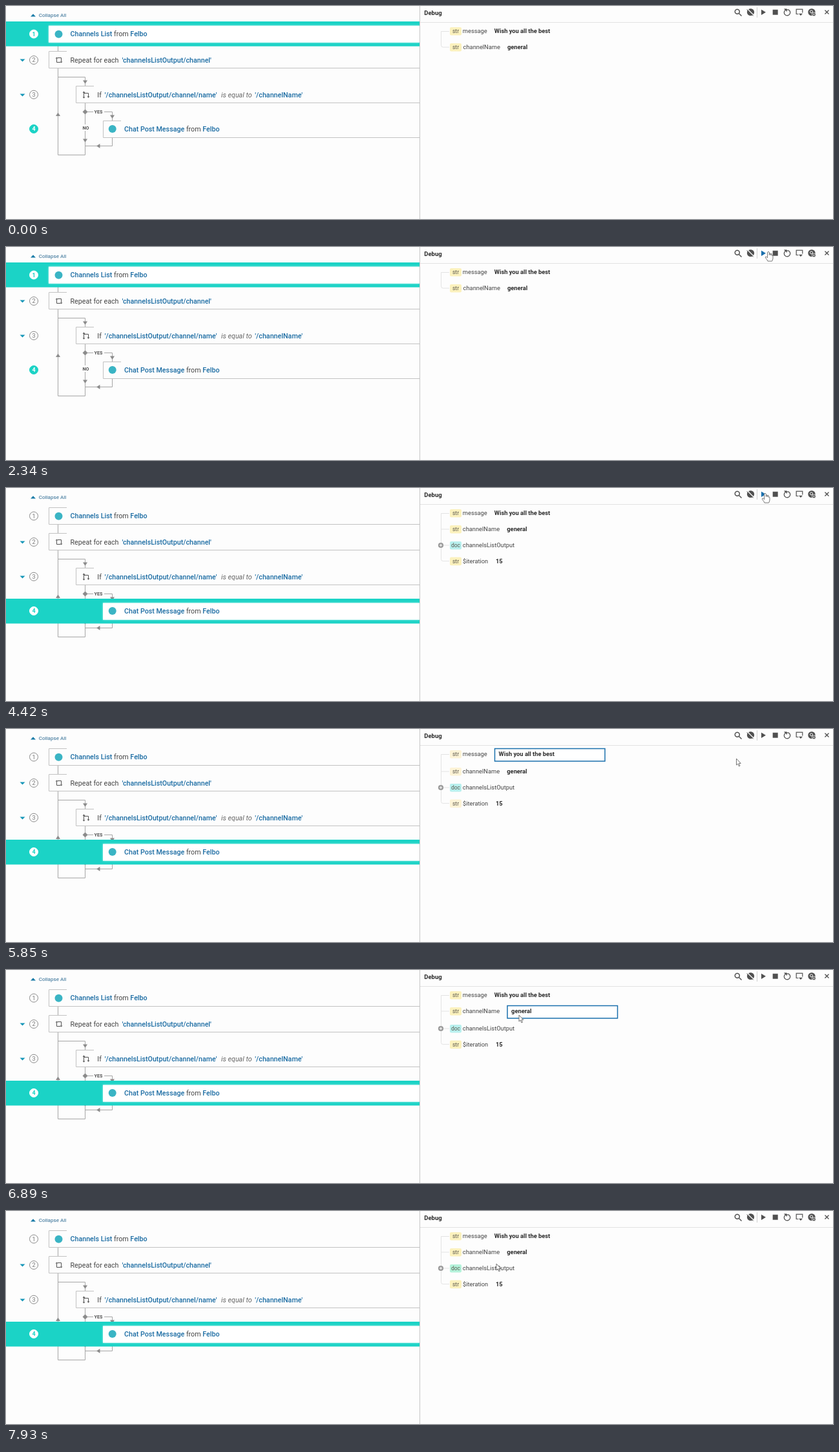
An HTML page for the animation above (8 s loop, 1280 px wide and 331 px high).

```html
<!DOCTYPE html>
<html lang="en">
<head>
<meta charset="utf-8">
<title>Flow debugger</title>
<style>
  html, body { margin: 0; width: 100%; height: 100%; overflow: hidden; background: #fdfdfd; }
  svg { display: block; width: 1280px; height: 331px; }
  text { font-family: Roboto, Arial, sans-serif; white-space: pre; fill: #444; }
  .link { fill: #1b6ca3; font-weight: 500; }
  .soft { font-style: italic; fill: #666; }
  .bold { font-weight: 700; fill: #2b2b2b; }
  .tag { font-weight: 700; fill: #505050; }
  .wire { fill: none; stroke: #a6a6a6; }
  .head { fill: #8b8b8b; }
  .icon { fill: none; stroke: #505050; stroke-width: 1.5; }
  .solid { fill: #505050; }
  .glow { filter: drop-shadow(0 0 1.5px rgba(255, 255, 255, .6)); }
</style>
</head>
<body>
<svg id="stage" viewBox="0 0 1280 331"></svg>
<script>
const LOOP = 8000, STEP = 130;
const LOAD_START = 3900, LOAD_END = 4420;
const TEAL = '#1bd3c6', BLUE = '#1b70ad', BRAND = '#3ab4c4';
const APP = 'Felbo';

// time, x, y of the pointer tip
const POINTER = [
  [260, 1150, 226], [1170, 1177, 4], [1950, 1180, 7], [2340, 1180, 7],
  [2600, 1176, 8], [3120, 1175, 8], [5849, 1175, 8], [5850, 1130.5, 46],
  [6630, 812, 66], [6890, 794, 70], [7540, 766, 83], [7930, 759, 82]
];

const stage = document.getElementById('stage');
const ease = p => p * p * (3 - 2 * p);
const text = (x, y, size, body, attrs = '') =>
  `<text x="${x}" y="${y}" font-size="${size}" ${attrs}>${body}</text>`;
const path = (d, cls, extra = '') => `<path d="${d}" class="${cls}" ${extra}/>`;
const rect = (x, y, w, h, fill, extra = '') =>
  `<rect x="${x}" y="${y}" width="${w}" height="${h}" fill="${fill}" ${extra}/>`;
const circle = (x, y, r, fill, extra = '') =>
  `<circle cx="${x}" cy="${y}" r="${r}" fill="${fill}" ${extra}/>`;
const link = body => `<tspan class="link">${body}</tspan>`;
const at = (x, y, body) => `<g transform="translate(${x} ${y})">${body}</g>`;

function arrow(x, y, angle) {
  return path('M-3.5-2.5h7L0 3z', 'head', `transform="translate(${x} ${y}) rotate(${angle})"`);
}

function pointerAt(t) {
  if (t < POINTER[0][0]) return null;
  const i = POINTER.findIndex(k => k[0] > t);
  if (i < 0) return POINTER[POINTER.length - 1].slice(1);
  const [t0, x0, y0] = POINTER[i - 1], [t1, x1, y1] = POINTER[i];
  const p = ease((t - t0) / (t1 - t0));
  return [x0 + (x1 - x0) * p, y0 + (y1 - y0) * p];
}

function badge(n, y, kind) {
  const styles = {
    plain: ['#fdfdfd', '#8a8a8a', '#777'],
    active: ['#fff', '#fff', TEAL],
    filled: [TEAL, TEAL, '#fff']
  };
  const [fill, stroke, ink] = styles[kind];
  const weight = kind === 'plain' ? 400 : 700;
  return circle(43, y, 6.5, fill, `stroke="${stroke}"`) +
    text(43, y + 3.2, 9, n, `text-anchor="middle" font-weight="${weight}" style="fill:${ink}"`);
}

function card(x, y, active) {
  if (!active) {
    return rect(x, y, 640 - x, 27, '#fdfdfd') +
      path(`M${x + 28} ${y + .5}H${x + .5}V${y + 26.5}H640`, 'wire', 'style="stroke:#c2c2c2"');
  }
  return rect(0, y - 6, 640, 38.6, TEAL) +
    rect(x, y + .6, 640 - x, 26.2, '#fff', 'class="glow"');
}

function wires() {
  return path('M80.5 57V70M80.5 97V231.5H122.5V151M80.5 110.5H122.5V124' +
      'M122.5 164.5H164.5V178M164.5 205V217.5H122.5', 'wire') +
    arrow(122.5, 118, 0) + arrow(80.5, 168.5, 180) + arrow(164.5, 172, 0) +
    arrow(122.5, 209, 0) + arrow(143, 217.5, 90) +
    path('M122.5 160.5l4 4-4 4-4-4z', 'head') +
    rect(135, 160, 17, 9, '#fdfdfd') + text(136.5, 167, 7.1, 'YES', 'class="tag"') +
    rect(117, 184, 13, 10, '#fdfdfd') + text(118.4, 192, 7.1, 'NO', 'class="tag"');
}

function flow(finished) {
  const caret = y => path(`M21.5 ${y - 1.6}h8l-4 4.2z`, '', 'fill="#1596b8"');
  const loopIcon = at(82, 84,
    path('M-3.5-2.5V3.5H2.2M3.5 2.5V-3.5H-2.2', 'icon', 'style="stroke-width:1"') +
    path('M-3.5-4.6l2 2.2h-4zM3.5 4.6l-2-2.2h4z', 'solid'));
  const forkIcon = at(124, 138,
    path('M-3.5-4V5M-3.5-2.5H3.5V3', 'icon', 'style="stroke-width:1"') +
    path('M-3.5-5.6l2 2.3h-4zM-3.5 5.6l2-2h-4zM3.5 4.8l2-2.3h-4z', 'solid'));
  return path('M38 16.5h8l-4-4.2z', '', 'fill="#1b7ca8"') +
    text(50.7, 17, 8.1, 'Collapse All', 'style="fill:#2c6a92"') +
    wires() + card(66, 70) + card(108, 124) +
    card(66, 30, !finished) + card(150, 178, finished) +
    badge(1, 43.5, finished ? 'plain' : 'active') + badge(2, 84, 'plain') +
    badge(3, 137.7, 'plain') + badge(4, 191, finished ? 'active' : 'filled') +
    caret(84) + caret(138) + loopIcon + forkIcon +
    circle(81.5, 43.7, 6, BRAND) + circle(164.7, 191, 6, BRAND) +
    text(99.5, 47, 10.7, `${link('Channels List')} from ${link(APP)}`) +
    text(99.5, 87.6, 10.7, 'Repeat for each') +
    text(179.5, 87.6, 10.7, link("'channelsListOutput/channel'")) +
    text(141.3, 141.8, 10.7, 'If') +
    text(152.7, 141.8, 10.7, link("'/channelsListOutput/channel/name'")) +
    text(333, 141.8, 10.7, 'is equal to', 'class="soft"') +
    text(385.3, 141.8, 10.7, link("'/channelName'")) +
    text(183, 194.8, 10.7, `${link('Chat Post Message')} from ${link(APP)}`);
}

function toolbar(playHot) {
  const disc = circle(0, 0, 5.6, '#505050');
  return path('M640.5 0V331', 'wire', 'style="stroke:#c6c6c6"') +
    path('M641 25.5H1280', 'wire', 'style="stroke:#e2e2e2"') +
    text(647.3, 14, 9.5, 'Debug', 'class="bold"') +
    at(1133, 10, circle(-1.2, -1.2, 3.5, 'none', 'class="icon"') + path('M1.5 1.5L5.5 5.5', 'icon')) +
    at(1152.5, 9.5, disc + path('M-5.5-5.5L5.5 5.5', 'icon', 'style="stroke:#fdfdfd"') +
      path('M-5.8-4.2L4.2 5.8', 'icon', 'style="stroke-width:1"')) +
    path('M1162.5 2V18', 'wire', 'style="stroke:#d0d0d0"') +
    path('M1169 5.5V14L1176 9.8z', '', `fill="${playHot ? BLUE : '#505050'}"`) +
    rect(1186.7, 5.7, 8, 8, '#505050') +
    at(1209, 10, path('M-2.6-3.8A4.7 4.7 0 1 0 2.2-4.1H-2', 'icon', 'style="stroke-width:1.3"') +
      path('M-5-5.7h4.6v4.6z', 'solid')) +
    at(1228, 9.5, path('M-1.5 3H-4.8V-4.3H4.8V1', 'icon', 'style="stroke-width:1.2"') +
      path('M-1 2.2h6L2 5.4z', 'solid')) +
    at(1247, 9.5, disc + circle(-.5, -.8, 2, 'none', 'stroke="#fdfdfd"') +
      circle(3.4, 3.4, 2.9, '#505050', 'stroke="#fdfdfd" stroke-width=".8"') +
      path('M2.6 2v2.8l2.2-1.4z', '', 'fill="#fdfdfd"')) +
    path('M1267.5 6.5l6 6m0-6l-6 6', 'icon', 'style="stroke-width:1.3"');
}

function variable(y, type, color, name, x, value, valueX, editing) {
  const box = editing
    ? rect(valueX + .7, y - 8.5, 170.5, 19.5, '#fff', `stroke="${BLUE}" stroke-width="1.5"`) : '';
  return rect(687, y - 6, 18, 12.6, color, 'rx="2"') +
    text(696, y + 3.2, 8.5, type, 'text-anchor="middle" style="fill:#5c5a50"') +
    text(x, y + 3.3, 9.3, name) + box +
    text(valueX + (editing ? 6.8 : 0), y + 3.3, 9.3, value, 'class="bold"');
}

function variables(finished, pointer, t) {
  const y = pointer ? pointer[1] : 0;
  const onFirst = y >= 27 && y < 53, onSecond = y >= 53 && y < 78;
  const second = onFirst ? 66 : 64;
  const shift = onFirst || onSecond ? 2 : 0;
  const third = 89 + shift, fourth = 113.6 + shift;
  const yellow = onFirst ? '#fdf3d6' : '#fbf1bd';
  const end = finished ? fourth : second;
  let out = path(`M686 39.5H673.5V${end - 3}q0 3 3 3H686` +
    (finished ? `M673.5 ${second}H686M673.5 ${third}H686` : ''), 'wire', 'style="stroke:#e3e3e3"');
  out += variable(39, 'str', yellow, 'message', 706.8, 'Wish you all the best', 755.8, onFirst) +
    variable(second, 'str', yellow, 'channelName', finished ? 706.8 : 707.6,
      'general', finished ? 775.3 : 776, onSecond);
  if (!finished) return out;
  return out +
    variable(third, 'doc', t < 7670 ? '#b9f0ee' : '#b4f2da', 'channelsListOutput', 706.8, '', 0) +
    variable(fourth, 'str', yellow, '$iteration', 707, '15', 758) +
    circle(673, third, 4.1, '#9a9a9a') +
    path(`M670.8 ${third}h4.4m-2.2-2.2v4.4`, 'wire', 'style="stroke:#fff"');
}

function loader(elapsed) {
  let out = '';
  for (let i = 0; i < 5; i++) {
    const phase = ((elapsed - i * 100 + 1200) % 1200) / 1200;
    const lift = ease(Math.max(0, 1 - Math.abs(phase - .2) / .2));
    const h = 40 * (.4 + .6 * lift);
    out += rect(949 + i * 6.1, 239 - h / 2, 3.8, h, BLUE);
  }
  return out;
}

function cursor([x, y]) {
  const style = 'stroke="#666" stroke-width=".9" stroke-linejoin="round" fill="#fff"';
  const hand = 'M-1.4 8V1.2Q0-.8 1.4 1.2V5.4Q3-.0 3.4 5.6Q5-.0 5.2 6.2Q7 5 7 7.4V11' +
    'Q6.6 13 5.6 15H-1Q-2 12.4-4.6 9.6Q-5 7.4-2.8 8.4L-1.4 9.8z';
  const pointer = 'M0 0V10L2.2 8l1.7 3.9 1.6-.7L3.8 7.4H6.8z';
  return at(x, y, path(y < 25 ? hand : pointer, '', style));
}

function draw(time) {
  const t = Math.floor((time % LOOP) / STEP) * STEP;
  const pointer = pointerAt(t);
  const finished = t >= LOAD_END;
  const loading = t >= LOAD_START && !finished;
  const playHot = pointer && pointer[1] < 25;
  return flow(finished) + toolbar(playHot) +
    (loading ? loader(t - LOAD_START) : variables(finished, pointer, t)) +
    (pointer ? cursor(pointer) : '');
}

const start = performance.now();
let shown = -1;
function tick() {
  const time = performance.now() - start;
  const step = Math.floor((time % LOOP) / STEP);
  if (step !== shown) {
    stage.innerHTML = draw(time);
    shown = step;
  }
  requestAnimationFrame(tick);
}
tick();
</script>
</body>
</html>
```
